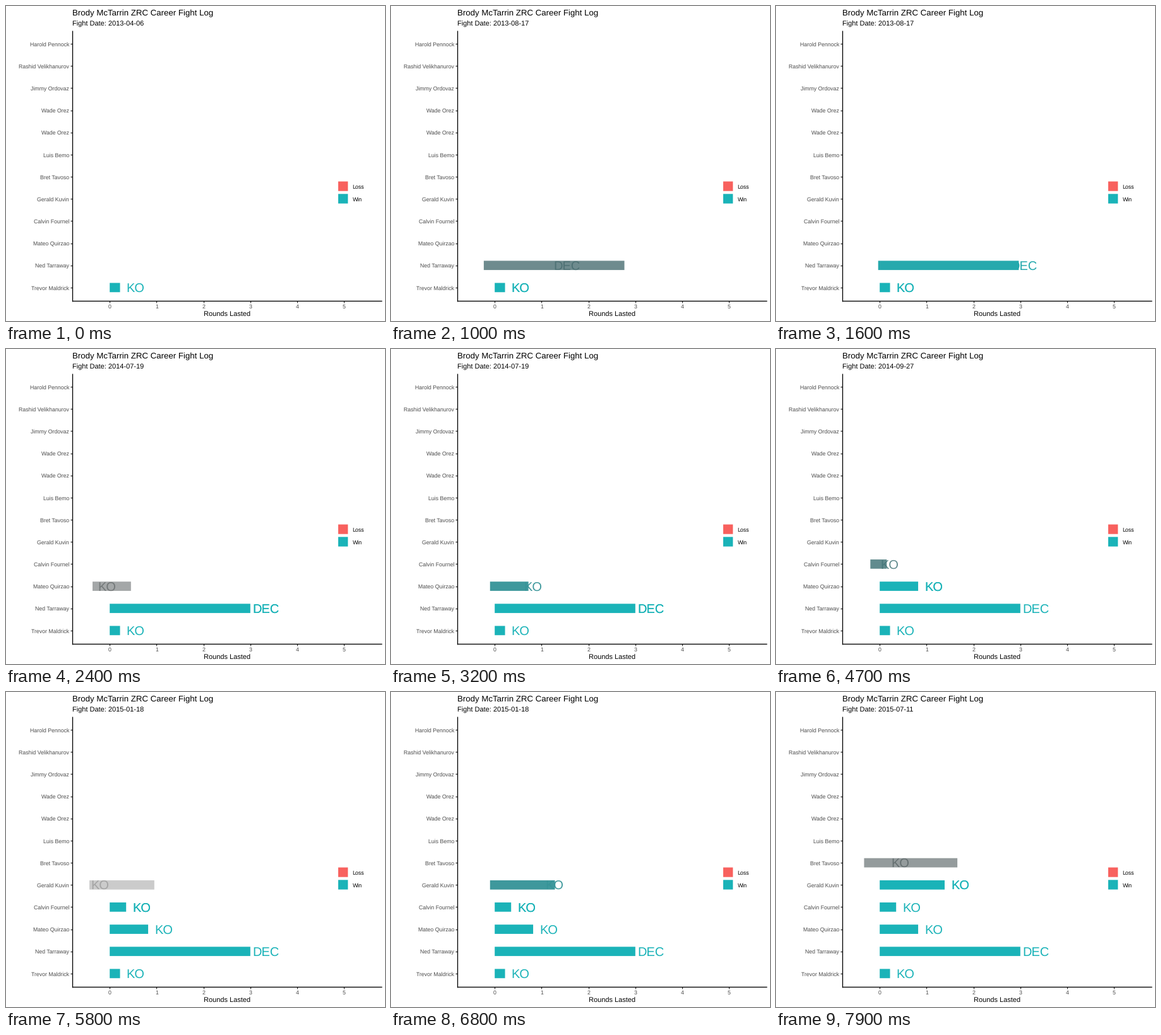
Recreate the animation shown at these times as a matplotlib script. Size 600 by 500 pixels, loop 8000 ms.

```python
import matplotlib.pyplot as plt
from matplotlib.animation import FuncAnimation
from matplotlib.patches import Rectangle

plt.rcParams["font.family"] = "Liberation Sans"
plt.rcParams["text.hinting"] = "none"

W, H, DPI = 600, 500, 100
LEFT, RIGHT, TOP, BOTTOM = 104.8, 594.5, 39, 468
X0, UNIT = 164.2, 74.2
ROW = (BOTTOM - TOP) / 12.2
HALF = 7.35
TEAL, RED = (26 / 255, 179 / 255, 184 / 255), (248 / 255, 97 / 255, 94 / 255)

# Steps per fight: 15 moving, then a short rest
PERIOD, MOVE = 18, 15

NAMES = ["Trevor Maldrick", "Ned Tarraway", "Mateo Quirzao", "Calvin Fournel",
         "Gerald Kuvin", "Bret Tavoso", "Luis Bemo", "Wade Orez", "Wade Orez",
         "Jimmy Ordovaz", "Rashid Velikhanurov", "Harold Pennock"]

FIGHTS = [("2013-04-06", 0.22, "KO"), ("2013-08-17", 3.00, "DEC"),
          ("2014-07-19", 0.82, "KO"), ("2014-09-27", 0.35, "KO"),
          ("2015-01-18", 1.385, "KO"), ("2015-07-11", 1.99, "KO")]

fig = plt.figure(figsize=(W / DPI, H / DPI), dpi=DPI, facecolor="white")
ax = fig.add_axes([0, 0, 1, 1])
ax.set_xlim(0, W)
ax.set_ylim(H, 0)
ax.axis("off")


def px(value):
    return X0 + UNIT * value


def row_y(i):
    return BOTTOM - ROW * (0.6 + i)


def label(x, y, text, size, color="black", ha="left"):
    return ax.text(x, y, text, fontsize=size * 72 / DPI, color=color,
                   ha=ha, va="baseline")


def line(xs, ys, color="black"):
    ax.plot(xs, ys, color=color, lw=1.07 * 72 / DPI * 1.25,
            solid_capstyle="butt")


def box(x, y, w, h, color):
    return ax.add_patch(Rectangle((x, y), w, h, facecolor=color, lw=0,
                                  snap=False))


def draw_static():
    label(105, 15, "Brody McTarrin ZRC Career Fight Log", 13.2)
    label((LEFT + RIGHT) / 2, 493, "Rounds Lasted", 11, ha="center")
    for i, name in enumerate(NAMES):
        y = row_y(i)
        label(100, y + 3.6, name, 8.8, "#4D4D4D", "right")
        line([LEFT - 2.7, LEFT], [y, y], "#333333")
    for v in range(6):
        label(px(v), 480, str(v), 8.8, "#4D4D4D", "center")
        line([px(v)] * 2, [BOTTOM, BOTTOM + 2.7], "#333333")
    line([LEFT, LEFT], [TOP, BOTTOM + 0.5])
    line([LEFT, RIGHT], [BOTTOM, BOTTOM])
    for y, name, color in [(278.5, "Loss", RED), (298.3, "Win", TEAL)]:
        box(525.9, y, 15.4, 15.2, color)
        label(548.6, y + 11.3, name, 8.8)


class Fight:
    """Bar with its result; the echo thickens the text of the last fight."""

    def __init__(self, i):
        self.date, self.rounds, result = FIGHTS[i]
        y = row_y(i)
        self.bar = box(px(0), y - HALF, UNIT * self.rounds, 2 * HALF, TEAL)
        self.text, self.echo = (
            label(px(0), y + 7.9, result, 20, TEAL, "center") for _ in "ab")

    def show(self, p, echo=False):
        self.bar.set_visible(p > 0)
        self.text.set_visible(p > 0)
        self.echo.set_visible(echo)
        color, alpha = tint(p), 1 - (1 - p) ** 2
        self.bar.set_x(px(-0.5 * (1 - p)))
        self.bar.set_facecolor(color)
        self.bar.set_alpha(alpha)
        x = px(-0.5 + p * (self.rounds + 0.83))
        self.text.set_x(x)
        self.echo.set_x(x)
        self.text.set_color(color)
        self.text.set_alpha(alpha)


def tint(p):
    """Near-black to teal, bowed through grey."""
    red = 26 + 172 * p * (1 - p)
    return red / 255, (25 + 154 * p) / 255, (25 + 159 * p) / 255


draw_static()
date = label(105, 32, "", 11)
fights = [Fight(i) for i in range(len(FIGHTS))]


def update(n):
    last, step = divmod(n - 2, PERIOD)
    if step >= MOVE:
        last, step = last + 1, 0
    p = step / MOVE
    for i, fight in enumerate(fights):
        if i <= last:
            fight.show(1, echo=i == last and p > 0)
        else:
            fight.show(p if i == last + 1 else 0)
    current = fights[last + (p > 0)]
    date.set_text("Fight Date: " + current.date)
    return []


anim = FuncAnimation(fig, update, frames=80, interval=100, repeat=True,
                     repeat_delay=0, init_func=lambda: update(0))
plt.show()
```
